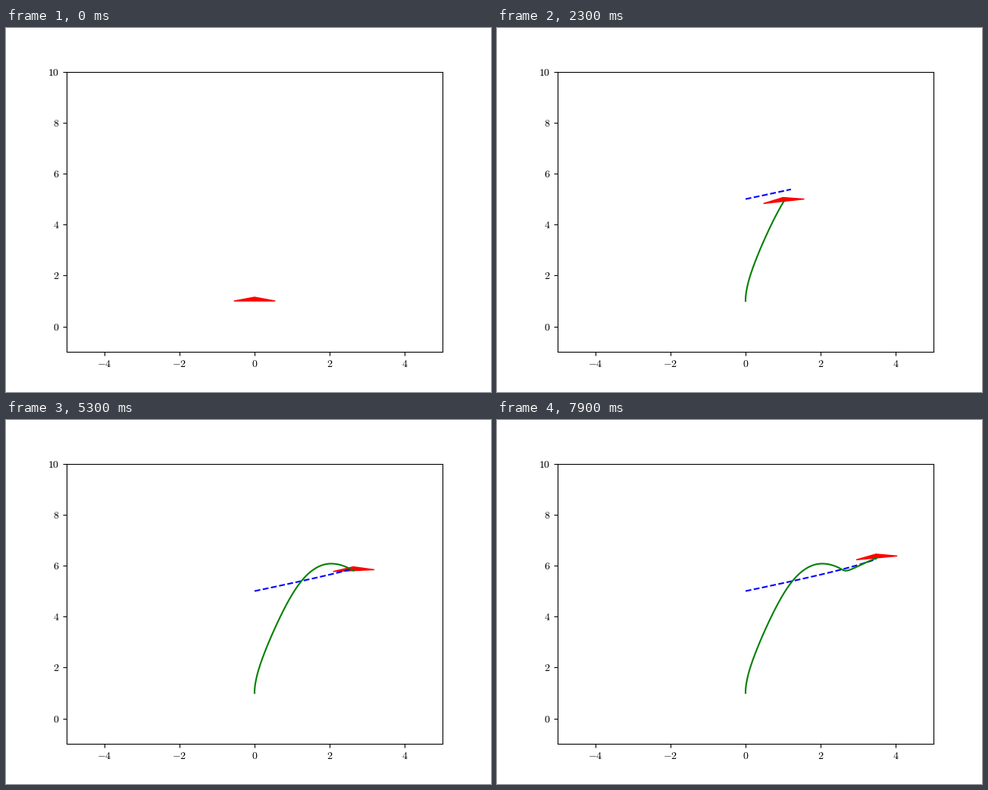
Recreate the animation shown at these times as a matplotlib script. Size 640 px wide and 480 px high, loop 8000 ms.

```python
import numpy as np
import matplotlib.pyplot as plt
from matplotlib.animation import FuncAnimation
from matplotlib.patches import Polygon

FRAMES, INTERVAL = 80, 100
ARM, NOSE = 0.55, 0.15
STEP = 9  # frames between flight keys


def glide(keys, n):
    """Smooth cubic spline through evenly spaced keys, starting at rest."""
    p = np.array(keys, float)
    size = len(p)
    a = 4 * np.eye(size) + np.eye(size, k=1) + np.eye(size, k=-1)
    a[0, :2] = 1, 0
    a[-1, -2:] = 1, 2
    b = np.zeros(size)
    b[1:-1] = 3 * (p[2:] - p[:-2])
    b[-1] = 3 * (p[-1] - p[-2])
    m = np.linalg.solve(a, b)
    k = n // STEP
    s = n / STEP - k
    ease = s * s * (3 - 2 * s)
    return (p[k] + (p[k + 1] - p[k]) * ease
            + s * (1 - s) * (m[k] * (1 - s) - m[k + 1] * s))


n = np.arange(FRAMES)
ref_x = 4 * np.sin(n / 75)
ref_y = 5 + 2.5 * np.sin(n / 150)
x = glide([0, 0.10, 0.67, 1.29, 1.91, 2.43, 2.66, 2.935, 3.277, 3.545], n)
y = glide([1, 1.88, 3.95, 5.47, 6.06, 5.95, 5.80, 5.935, 6.17, 6.335], n)
tilt = glide([0, -0.265, 0, 0.25, 0.42, 0.43, 0.02, -0.09, 0.13, 0.115], n)

# The serif family sets the line height behind the math digits
plt.rcParams.update({"mathtext.fontset": "cm", "font.family": "Liberation Serif"})
fig, ax = plt.subplots(figsize=(6.4, 4.8), dpi=100)
ax.set(xlim=(-5, 5), ylim=(-1, 10))
xticks, yticks = range(-4, 5, 2), range(0, 11, 2)
ax.set_xticks(xticks, [f"${v}$" for v in xticks])
ax.set_yticks(yticks, [f"${v}$" for v in yticks])

body = np.array([(-ARM, 0), (ARM, 0), (0, NOSE)])
drone = ax.add_patch(Polygon(body, color="r"))
ref, = ax.plot([], [], "b--")
trail, = ax.plot([], [], "g")


def draw(i):
    c, s = np.cos(tilt[i]), np.sin(tilt[i])
    drone.set_xy(body @ np.array([(c, s), (-s, c)]) + (x[i], y[i]))
    ref.set_data(ref_x[:i + 1], ref_y[:i + 1])
    trail.set_data(x[:i + 1], y[:i + 1])
    return drone, ref, trail


anim = FuncAnimation(fig, draw, frames=FRAMES, interval=INTERVAL,
                     repeat=True, repeat_delay=0)
plt.show()
```
